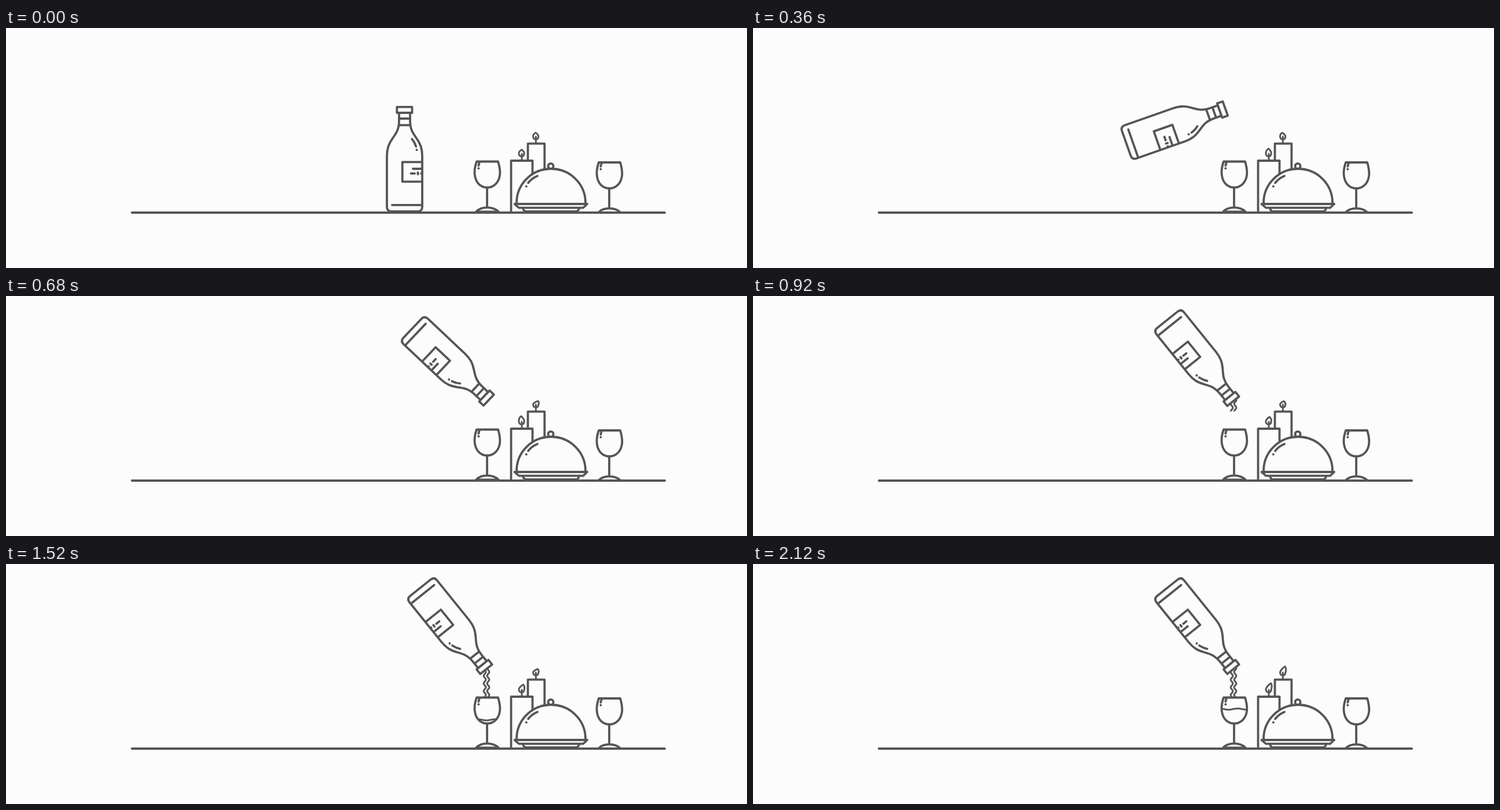
Animation of 1280 by 416 pixels, one loop 2.16 s. Source, as an HTML page:

```html
<!DOCTYPE html>
<html lang="en">
<head>
<meta charset="utf-8">
<title>Dinner table</title>
<style>
  html, body { margin: 0; width: 100%; height: 100%; overflow: hidden; background: #fcfcfc; }
  svg { display: block; width: 100%; height: 100%; }
  .ink { fill: none; stroke: #555; stroke-width: 3.8; stroke-linecap: round; stroke-linejoin: round; }
  .solid { fill: #fcfcfc; }
  .dot { fill: #555; stroke: none; }
  .thin { stroke-width: 3; }
</style>
</head>
<body>
<svg viewBox="0 0 1280 416" class="ink">
  <defs>
    <path id="bowl" d="M813 231.5H850C852 238 853.3 244 853.3 251C853 267 843 276.5 831.3 276.5C819 276.5 810 267 809.5 251C809.3 244 811 237 813 231.5Z"/>
    <clipPath id="inBowl"><use href="#bowl"/></clipPath>
    <clipPath id="poured"><rect id="pouredArea" x="815" y="175" width="30" height="0"/></clipPath>
    <g id="glass">
      <use href="#bowl"/>
      <path d="M831 277V311M812 318.5C821 308.7 841 308.7 851 318.5Z"/>
      <path d="M817.6 233.5L816.3 238.5"/>
      <circle class="dot" cx="816.3" cy="243.3" r="2"/>
    </g>
  </defs>

  <path d="M217.5 320H1138"/>

  <!-- candles -->
  <path class="solid" d="M901.5 318V200.3H930.3V318"/>
  <path class="solid" d="M872.5 317V230H909.5V317"/>
  <path id="flameRight" class="thin"/>
  <path id="flameLeft" class="thin"/>
  <path class="thin" d="M915.3 199V188M891 229V218"/>

  <!-- covered dish -->
  <circle class="solid" cx="941" cy="239.4" r="4.5"/>
  <path class="solid" d="M882 305V303A59.5 59 0 0 1 1001 303V305"/>
  <path class="solid" d="M893 312Q894 318 899 318H984Q989 318 990 312"/>
  <path class="solid" d="M878.5 305H1004L997 311.7H886Z"/>
  <path d="M902 268.5Q908 260.5 918 256.5"/>
  <circle class="dot" cx="898.8" cy="274.5" r="2"/>

  <!-- wine and glasses -->
  <g clip-path="url(#poured)"><path id="stream" class="thin"/></g>
  <g clip-path="url(#inBowl)"><path id="wine" class="thin"/></g>
  <use href="#glass"/>
  <use href="#glass" x="211" y="1.5"/>

  <g id="bottle">
    <path class="solid" d="M679 147V160C679 175 675 181 668 191C661 201 658 209 658 222V310Q658 318 666 318H711Q719 318 719 310V222C719 209 716 201 709 191C702 181 698 175 698 160V147Z"/>
    <path class="solid" d="M675.3 136.8H701.5V147H675.3Z"/>
    <path d="M679 157H698M679 168.3H698M667 306.8H718M718 232.3H684.7V266.3H718"/>
    <path d="M703 244H718M699.5 252.2H706M711.5 250.5V253.5M717 252.2H718"/>
    <path d="M701.3 192.5Q706 198 708.3 205.5"/>
    <circle class="dot" cx="709.5" cy="211.2" r="2"/>
  </g>
</svg>
<script>
const LOOP = 2160, STEP = 40, LIFT_END = 720;
const get = id => document.getElementById(id);
const setPath = (id, d) => get(id).setAttribute('d', d);

// Flame tips: [time, x, y]
const leftTips = [[0, 891, 211], [120, 891, 209.5], [360, 890.6, 209], [680, 890, 208.3],
  [1200, 895, 211], [1520, 893.5, 209], [2120, 894.6, 206.7]];
const rightTips = [[0, 915, 181.5], [120, 914.5, 182.5], [360, 914.3, 181.5], [680, 919, 182],
  [1200, 914.5, 182.5], [1520, 918.3, 182], [2120, 919, 177.5]];

function tipAt(keys, t) {
  const i = Math.max(1, keys.findIndex(k => k[0] >= t));
  const [a, b] = [keys[i - 1], keys[i]];
  const p = (t - a[0]) / (b[0] - a[0]);
  return [a[1] + (b[1] - a[1]) * p, a[2] + (b[2] - a[2]) * p];
}

function flame(cx, base, [x, y]) {
  return `M${x} ${y}C${x + 2} ${y + 2} ${cx + 5.5} ${base - 8} ${cx + 4.5} ${base - 4}` +
    `C${cx + 4} ${base - 1} ${cx + 2} ${base} ${cx} ${base}` +
    `C${cx - 2} ${base} ${cx - 4.5} ${base - 1} ${cx - 4.7} ${base - 5}` +
    `C${cx - 4.7} ${base - 8} ${x - 3} ${y + 1.5} ${x} ${y}Z`;
}

function polyline(from, to, point) {
  const points = [];
  for (let v = from; v <= to; v++) points.push(point(v));
  return 'M' + points.join('L');
}

function strand(x, t) {
  const wave = y => Math.cos((y - 195 - (t - 1200) * 0.1) * 2 * Math.PI / 13.3);
  return polyline(177, 232, y => `${x + 1.9 * wave(y)} ${y}`);
}

function draw(t) {
  const lift = Math.min(t / LIFT_END, 1);
  get('bottle').setAttribute('transform',
    `translate(${84.7 * lift} ${-115 * lift}) rotate(${141.2 * lift} 688.3 227)`);

  setPath('flameLeft', flame(890.6, 222.5, tipAt(leftTips, t)));
  setPath('flameRight', flame(915.2, 193, tipAt(rightTips, t)));

  const streamEnd = t < LIFT_END ? 175 : Math.min(180 + (t - LIFT_END) * 0.1, 231);
  get('pouredArea').setAttribute('height', streamEnd - 175);
  setPath('stream', strand(827, t) + strand(833, t));

  const level = 270 - (t - 1520) * 0.0308;
  setPath('wine', polyline(806, 856, x => `${x} ${level + Math.sin((x - 822) / 5 - (t - 1520) / 130)}`));
}

function tick(now) {
  draw(Math.floor(now % LOOP / STEP) * STEP);
  requestAnimationFrame(tick);
}
draw(0);
requestAnimationFrame(tick);
</script>
</body>
</html>
```
